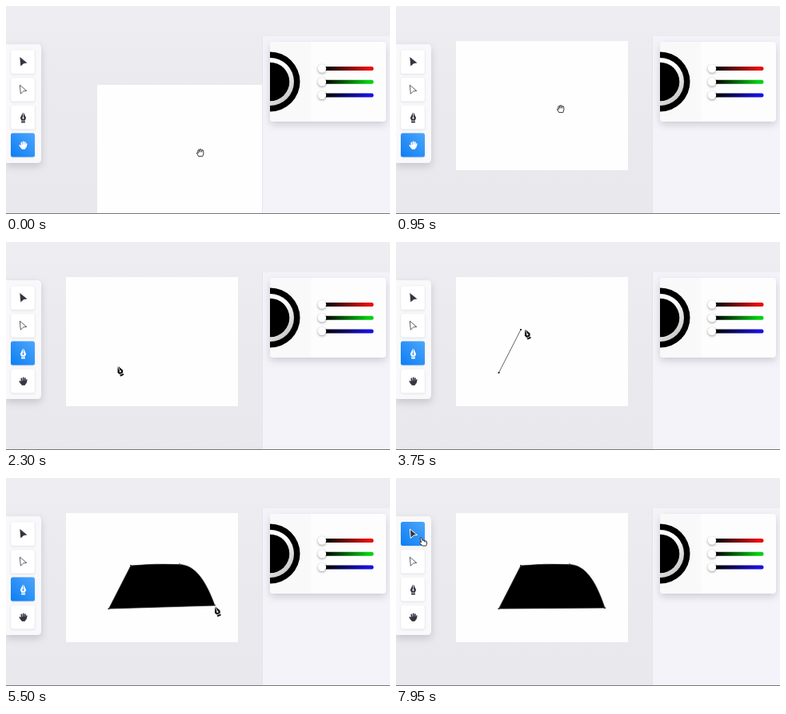
These frames come from a looping animation (480x261 px, 8 s). An HTML page:

```html
<!DOCTYPE html>
<html lang="en">
<head>
<meta charset="utf-8">
<title>Drawing tool</title>
<style>
  html, body { margin: 0; width: 100%; height: 100%; overflow: hidden; background: #eae9ee; }
  svg { display: block; width: 100%; height: 100%; }
  .tile { fill: #fff; stroke: #eeeef2; stroke-width: .6; filter: drop-shadow(0 1px 1px #20204018); }
  .tool { color: #343641; }
  .tool.on { color: #fff; }
  .tool.on .tile { fill: url(#blue); stroke: none; }
  .tool.on .select { fill: #343641; stroke: #fff; stroke-width: 1; }
  .panel { filter: drop-shadow(0 4px 5px #30304030); }
  .knob { fill: #fff; filter: drop-shadow(0 1px 1.5px #0006); }
</style>
</head>
<body>
<svg viewBox="0 0 480 261" preserveAspectRatio="none">
  <defs>
    <linearGradient id="wall" x2="0" y2="1">
      <stop stop-color="#eeedf1"/><stop offset=".5" stop-color="#eae9ee"/><stop offset="1" stop-color="#e9e8ed"/>
    </linearGradient>
    <linearGradient id="blue" y1="1" x2="1" y2="0">
      <stop stop-color="#0b7df4"/><stop offset="1" stop-color="#4ea6fb"/>
    </linearGradient>
    <linearGradient id="ring" x2="1" y2="1">
      <stop offset=".5" stop-color="#fff"/><stop offset="1" stop-color="#b4b4b4"/>
    </linearGradient>
    <clipPath id="cardClip"><rect x="330" y="45" width="145" height="100" rx="4"/></clipPath>

    <g id="hand" stroke="currentColor" fill="currentColor" stroke-linecap="round" stroke-linejoin="round">
      <path d="M-2.2-3.3L-1.7 1M.2-4.3V1M2.4-3.5L2 1M4.3-1.6L3.3 2M-4.2.2L-2 3" fill="none" stroke-width="1.7"/>
      <path d="M-2.2 0H3.4L3 3L2 4.7H-1.6L-3 2.5Z" stroke-width=".8"/>
    </g>
    <g id="nib">
      <path fill="currentColor" fill-rule="evenodd"
        d="M-.35-6.3V-.4A1.1 1.1 0 1 0 .35-.4V-6.3L3.7.7L2.2 3.8H-2.2L-3.7.7ZM-2.4 4.5H2.4V6.6H-2.4Z"/>
    </g>
    <g id="penCursor" transform="rotate(-24) translate(0 6.3)">
      <path d="M0-6.5L3.7.7L2.4 3.8V6.6H-2.4V3.8L-3.7.7Z" fill="#fff" stroke="#fff" stroke-width="1.6"/>
      <use href="#nib" color="#111"/>
    </g>
    <g id="handCursor">
      <g stroke="#222" fill="#fff" stroke-width=".9" stroke-linejoin="round">
        <path d="M-2.3 4.6L-4.4 1Q-4.6-.6-3.1 0L-2.6.6L-3.4-2.3Q-3-3.8-1.9-3Q-1.4-5-.1-3.9Q1.2-5 2-3.3Q3.6-3.7 3.7-1.8Q4.6 1 2.8 4.6Z"/>
        <path d="M-1.9-3L-1.2-.5M-.1-3.9L.2-.8M2-3.3L1.6-.6" fill="none"/>
      </g>
    </g>
    <g id="pointCursor" stroke="#222" fill="#fff" stroke-width=".9" stroke-linejoin="round">
      <path d="M-.9 1Q0-.6 1 .8L2.2 4Q3.5 3.2 4.2 4Q5.5 3.4 6 4.6Q7.3 4.4 7.5 6Q8 8.4 6.6 10.6H2.2L-1.4 7Q-1.5 5.5 .6 6.2Z"/>
      <path d="M4.2 4L4.6 5.8M6 4.6L6.2 6.2" fill="none"/>
    </g>
  </defs>

  <rect width="480" height="261" fill="url(#wall)"/>

  <g id="board">
    <rect width="215" height="162" fill="#fefefe"/>
  </g>
  <path id="shape" stroke="#222" stroke-width=".7"/>
  <g id="nodes"></g>

  <g class="panel"><path d="M0 48H39Q44 48 44 53V192Q44 197 39 197H0Z" fill="#f9f9fb"/></g>
  <g id="tools"></g>

  <rect x="320" y="38" width="1.5" height="222" fill="#e5e4ea"/>
  <rect x="321" y="38" width="159" height="222" fill="#f4f3f9"/>
  <rect class="panel" x="330" y="45" width="145" height="100" rx="4" fill="#fdfdfe"/>
  <g clip-path="url(#cardClip)">
    <rect x="330" y="45" width="51" height="100" fill="#f9f9fa"/>
    <circle cx="330" cy="95" r="37.5"/>
    <circle cx="330" cy="95" r="30" fill="url(#ring)"/>
    <circle cx="330" cy="95" r="24.3"/>
  </g>
  <g id="sliders"></g>
  <rect y="260" width="480" height="1" fill="#77767b"/>
  <use id="cursor"/>
</svg>

<script>
const LOOP = 8000;
const byId = id => document.getElementById(id);

const icons = [
  '<path class="select" d="M-4.2-6.3L5 1.2L.8 1.6L-3.2 5.3Z" fill="currentColor"/>',
  '<path d="M-4.2-5.9L4.3 1.4L.4 1.7L-3.2 5.1Z" fill="#fff" stroke="currentColor" stroke-width=".8"/>',
  '<use href="#nib"/>',
  '<use href="#hand"/>'
];
byId('tools').innerHTML = icons.map((icon, i) =>
  `<g class="tool" transform="translate(21 ${70 + i * 34.8})">
     <rect class="tile" x="-15" y="-15" width="30" height="30" rx="2.5"/>
     <g transform="translate(.5 .3)">${icon}</g></g>`).join('');
const tools = [...byId('tools').children];

byId('sliders').innerHTML = ['#e80909', '#08cf12', '#1712df'].map((color, i) => {
  const y = 78.5 + i * 16.7;
  return `<linearGradient id="track${i}"><stop offset=".08"/><stop offset=".9" stop-color="${color}"/></linearGradient>
    <rect x="394" y="${y - 2.5}" width="65.5" height="5" rx="2.5" fill="url(#track${i})"/>
    <circle class="knob" cx="395" cy="${y}" r="5.2"/>`;
}).join('');

// Rows of [time, x, y]
const boardPath = [[50, 114, 99], [850, 75, 44]];
const cursorPath = [
  [50, 243, 184], [850, 206, 129], [1000, 206, 129],
  [1550, 27, 138], [1850, 27, 138], [2250, 140, 156], [2600, 140, 156],
  [2800, 128.5, 164], [2900, 128.5, 164], [3400, 156, 110], [3650, 156, 110],
  [4200, 217, 108], [4300, 217, 108], [4700, 236, 109], [4800, 236, 109],
  [5250, 261, 157], [5500, 261.5, 161.5], [5650, 261.5, 163], [5800, 261.5, 163],
  [6450, 128.5, 165], [6850, 128.5, 165], [7500, 50, 94], [7850, 31, 74.5]
];
const cornerPath = [[5250, 261, 157], [5500, 261, 160], [5650, 261, 163]];
const handlePath = [[4300, 217, 108.5], [4700, 236, 109.5]];

function sample(path, t) {
  const next = path.findIndex(row => row[0] > t);
  if (next === 0) return path[0].slice(1);
  if (next < 0) return path[path.length - 1].slice(1);
  const [t0, x0, y0] = path[next - 1], [t1, x1, y1] = path[next];
  const p = (t - t0) / (t1 - t0), e = p * p * (3 - 2 * p);
  return [x0 + (x1 - x0) * e, y0 + (y1 - y0) * e];
}

function drawShape(t) {
  const corner = sample(cornerPath, t), handle = sample(handlePath, t);
  const points = [[2850, 128.5, 164], [3450, 156, 110], [4250, 217, 108.5], [5250, ...corner]]
    .filter(row => t >= row[0]);
  let d = '';
  if (points.length > 1) d = 'M128.5 164L156 110';
  if (points.length > 2) d += `Q${217 - (handle[0] - 217) * 1.6} 107.2 217 108.5`;
  if (points.length > 3) d += `C${handle} 249 127 ${corner}`;
  if (points.length > 2) d += 'Z';
  byId('shape').setAttribute('d', d);
  byId('shape').setAttribute('fill', points.length > 2 ? '#000' : 'none');
  byId('nodes').innerHTML = points.map(([, x, y]) =>
    `<rect x="${x - 1}" y="${y - 1}" width="2" height="2" fill="${points.length > 2 ? '#39405e' : '#333'}"/>`).join('');
}

function render(t) {
  byId('board').setAttribute('transform', `translate(${sample(boardPath, t)})`);
  drawShape(t);

  const active = t < 1700 ? 3 : t < 7750 ? 2 : 0;
  tools.forEach((tool, i) => tool.classList.toggle('on', i === active));

  const [x, y] = sample(cursorPath, t);
  const kind = x < 45 ? 'point' : t < 1700 ? 'hand' : 'pen';
  byId('cursor').setAttribute('href', `#${kind}Cursor`);
  byId('cursor').setAttribute('transform', `translate(${x} ${y})`);
}

const start = performance.now();
function tick() {
  render((performance.now() - start) % LOOP);
  requestAnimationFrame(tick);
}
tick();
</script>
</body>
</html>
```
